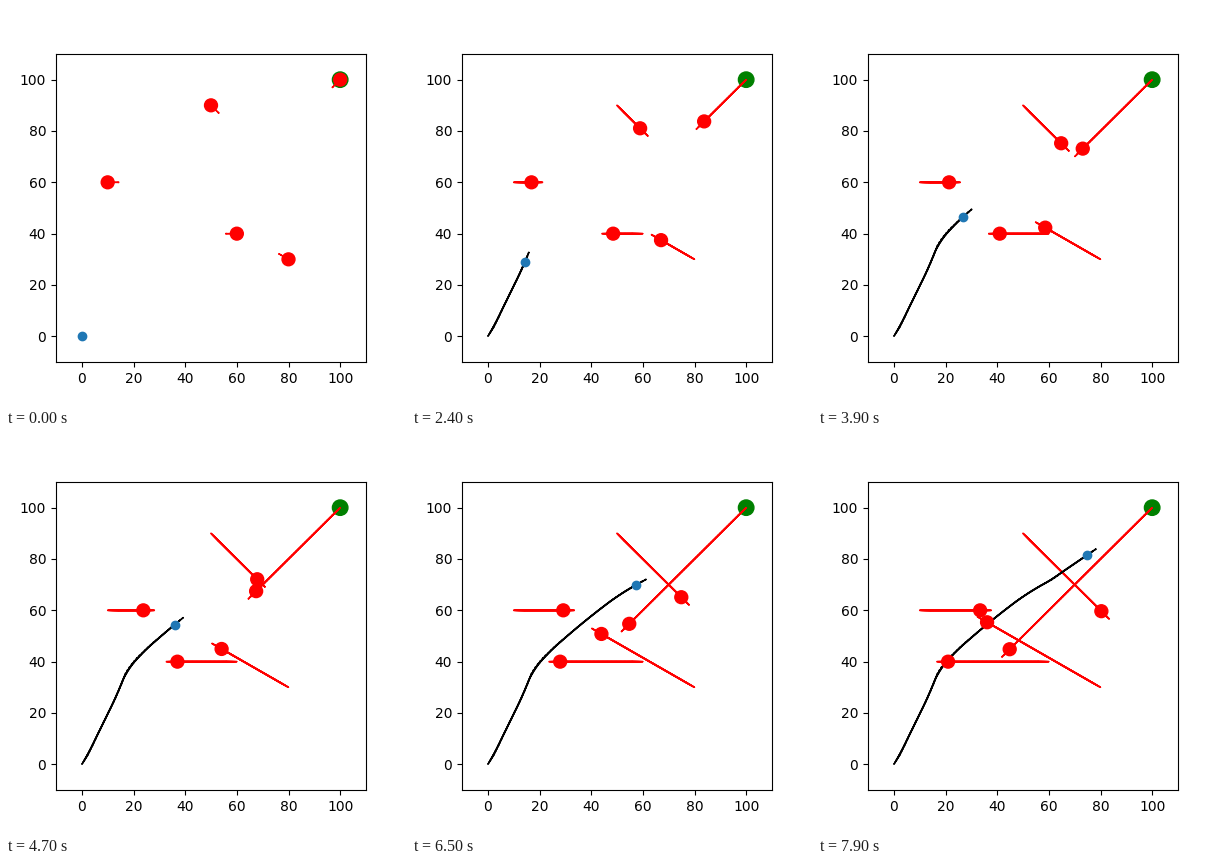
Animation of 400 by 400 pixels, one loop 8 s. Source, as a matplotlib script:

```python
import numpy as np
import matplotlib.pyplot as plt
from matplotlib.animation import FuncAnimation

FRAMES, STEP_MS = 80, 100
ARROW_LEN = 4
ROBOT_SPEED, START_LAG = 1.48, 0.565

# start x, start y, heading in degrees, speed per step
OBSTACLES = np.array([
    (10, 60, 0, 0.30),
    (50, 90, -45, 0.55),
    (60, 40, 180, 0.50),
    (80, 30, 150, 0.65),
    (100, 100, 225, 1.00),
])


def unit(deg):
    a = np.radians(deg)
    return np.stack([np.cos(a), np.sin(a)], axis=-1)


def robot_heading(step):
    """The robot swerves right, then weaves past the crossing obstacles."""
    return np.interp(step, [1, 8, 18, 26, 33, 39, 55, 65, 69],
                     [58, 64, 64, 68, 49, 42, 37.5, 29.5, 34.5])


# The first step is a standstill; after it the robots start to move.
steps = np.arange(FRAMES)
moves = np.maximum(steps - 1, 0)

speed = ROBOT_SPEED * (1 - START_LAG ** moves)
robot_dir = unit(robot_heading(steps))
robot_path = np.cumsum(speed[:, None] * unit(robot_heading(steps - 0.5)), axis=0)

obstacle_dir = unit(OBSTACLES[:, 2])
obstacle_paths = (OBSTACLES[:, :2]
                  + moves[:, None, None] * OBSTACLES[:, 3:] * obstacle_dir)

fig, ax = plt.subplots(figsize=(4, 4), dpi=100)
ax.set_xlim(-10, 110)
ax.set_ylim(-10, 110)


def add_disc(pos, radius, color, zorder):
    return ax.add_patch(plt.Circle(pos, radius, color=color, zorder=zorder))


def add_arrow(pos, direction, color):
    return ax.arrow(*pos, *(ARROW_LEN * direction), width=0.1, color=color)


add_disc((100, 100), 3, "g", 0.9)
robot = ax.scatter(0, 0, zorder=3)
discs = [add_disc(pos, 2.5, "r", 3) for pos in obstacle_paths[0]]

# Arrows pile up over time and form the trails.
trails = []
for k in steps:
    arrows = [add_arrow(p, d, "r") for p, d in zip(obstacle_paths[k], obstacle_dir)]
    if k > 0:
        arrows.append(add_arrow(robot_path[k], robot_dir[k], "k"))
    trails.append(arrows)


def update(k):
    for i, arrows in enumerate(trails):
        for arrow in arrows:
            arrow.set_visible(i <= k)
    robot.set_offsets([robot_path[k]])
    for disc, pos in zip(discs, obstacle_paths[k]):
        disc.center = pos
    return []


anim = FuncAnimation(fig, update, frames=FRAMES, interval=STEP_MS,
                     init_func=lambda: update(0), repeat=True,
                     repeat_delay=0, blit=False)
plt.show()
```
